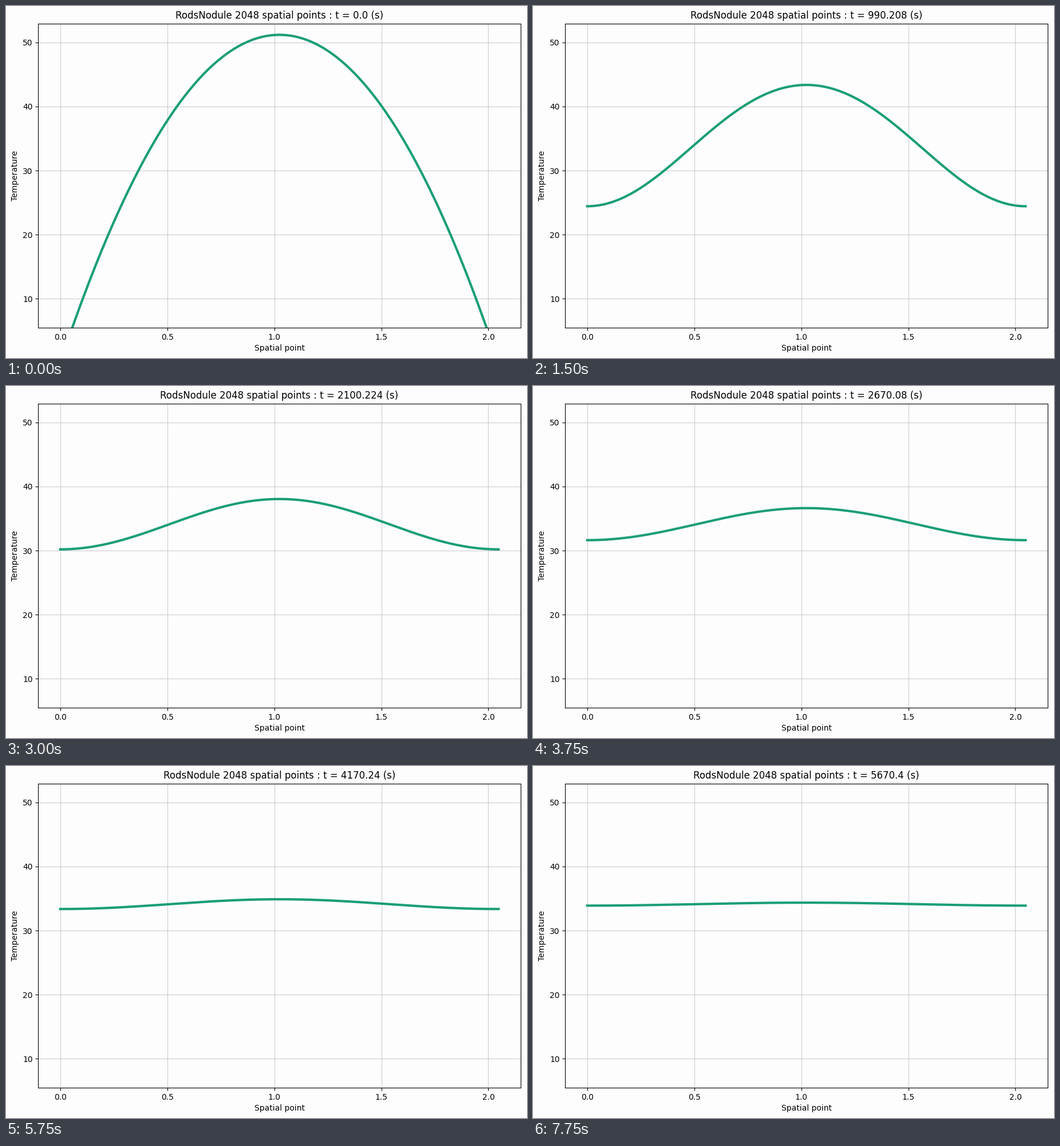
Animation of 910x616 px, one loop 8 s. Source, as a matplotlib script:

```python
import math

import matplotlib.pyplot as plt
import numpy as np
from matplotlib.animation import FuncAnimation

W, H, DPI = 910, 616, 100
FRAMES, INTERVAL = 32, 250

LENGTH = 2.048        # rod length
PEAK = 51.2           # starting temperature in the middle
DIFFUSIVITY = 8.418e-5
STEP = 0.512          # solver steps between time checks
SAVE_EVERY = 30       # seconds between saved states

plt.rcParams["font.family"] = "DejaVu Sans"
plt.rcParams["font.size"] = 10

x = np.linspace(0, LENGTH, 1025)
k = np.arange(1, 201)[:, None]
wave = 2 * np.pi * k / LENGTH
modes = np.cos(wave * x) * 4 * PEAK / (np.pi * k) ** 2


def sim_time(n):
    """Simulated seconds of the saved state shown at frame n."""
    state = max(0, math.floor(6.25 * n - 4.13))
    return round(STEP * math.ceil(SAVE_EVERY * state / STEP), 3)


def temperature(t):
    """Parabolic start that evens out between insulated ends."""
    decay = np.exp(-DIFFUSIVITY * wave ** 2 * t)
    return PEAK * 2 / 3 - (modes * decay).sum(axis=0)


fig = plt.figure(figsize=(W / DPI, H / DPI), dpi=DPI, facecolor="#fdfdfe")
left, right, top, bottom = 56.4, 898.7, 30.5, 562.9
ax = fig.add_axes([left / W, 1 - bottom / H, (right - left) / W, (bottom - top) / H],
                  facecolor="#fdfdfe")
ax.set_xlim(-0.05 * LENGTH, 1.05 * LENGTH)
ax.set_ylim(5.48, 52.98)
ax.set_xticks(np.arange(0, 2.1, 0.5))
ax.set_yticks(range(10, 51, 10))
ax.grid(color="#cdcdd2", linewidth=0.8)
ax.set_xlabel("Spatial point")
ax.set_ylabel("Temperature")
title = ax.set_title("", fontsize=12)
line, = ax.plot(x, temperature(0), color="#1b9e77", linewidth=3)


def draw(n):
    t = sim_time(n)
    line.set_ydata(temperature(t))
    title.set_text(f"RodsNodule 2048 spatial points : t = {t} (s)")
    return line, title


anim = FuncAnimation(fig, draw, frames=FRAMES, interval=INTERVAL,
                     repeat=True, repeat_delay=0, blit=False)
plt.show()
```
